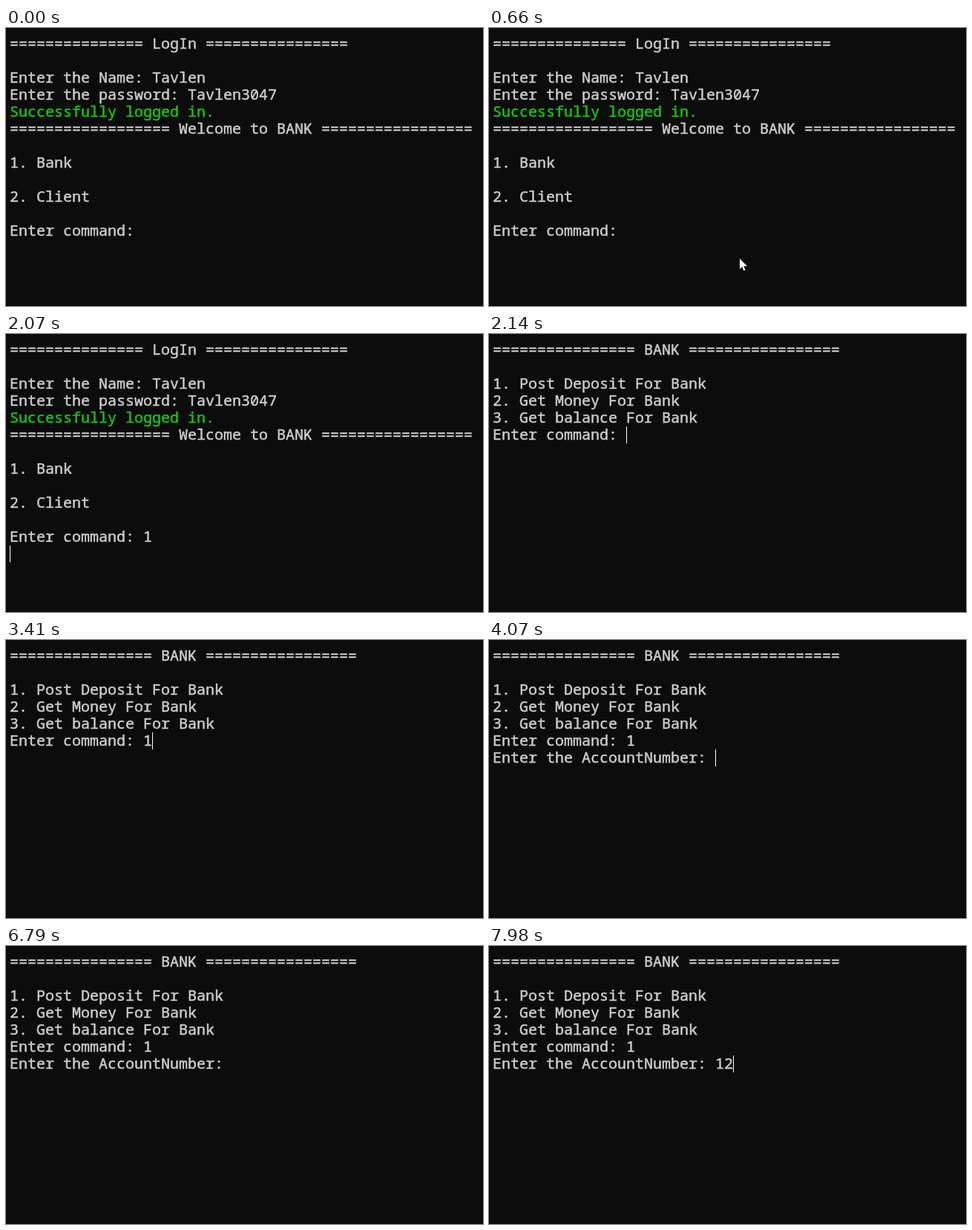
Recreate the animation shown at these times as an HTML page with a canvas. Size 643 by 376 pixels, loop 8 s.

```html
<!DOCTYPE html>
<html lang="en">
<head>
<meta charset="utf-8">
<title>Terminal session</title>
<style>
  html, body { margin: 0; width: 100%; height: 100%; overflow: hidden; background: #0c0c0c; }
  canvas { display: block; }
</style>
</head>
<body>
<canvas id="stage" width="643" height="376"></canvas>
<script>
const LOOP = 8000;
const LEFT = 5, TOP = 10, CELL = 12, ROW = 23, BASELINE = 18;
const GREEN = '#16c60c', GREY = '#cccccc';
const ctx = document.getElementById('stage').getContext('2d');

const rule = (left, title, right) => `${'='.repeat(left)} ${title} ${'='.repeat(right)}`;

const welcome = [
  rule(15, 'LogIn', 16), '',
  'Enter the Name: Tavlen',
  'Enter the password: Tavlen3047',
  'Successfully logged in.',
  rule(18, 'Welcome to BANK', 17), '',
  '1. Bank', '',
  '2. Client', '',
  'Enter command: '
];
const bank = [
  rule(16, 'BANK', 17), '',
  '1. Post Deposit For Bank',
  '2. Get Money For Bank',
  '3. Get balance For Bank',
  'Enter command: '
];
const account = 'Enter the AccountNumber: ';

// Each state starts at `at`: the screen, what is added to it, and whether the caret shows.
const states = [
  { at: 0,    screen: welcome, typed: '', caret: false },
  { at: 1260, screen: welcome, typed: '', caret: true },
  { at: 1530, screen: welcome, typed: '1', caret: true },
  { at: 2070, screen: welcome, typed: '1\n', caret: true },
  { at: 2140, screen: bank, typed: '', caret: true },
  { at: 2680, screen: bank, typed: '', caret: false },
  { at: 3210, screen: bank, typed: '', caret: true },
  { at: 3410, screen: bank, typed: '1', caret: true },
  { at: 4010, screen: bank, typed: '1\n', caret: true },
  { at: 4070, screen: bank, typed: '1\n' + account, caret: true, blinkFrom: 4670 },
  { at: 7720, screen: bank, typed: '1\n' + account + '1', caret: true },
  { at: 7980, screen: bank, typed: '1\n' + account + '12', caret: true }
];

function caretVisible(state, t) {
  if (!state.blinkFrom || t < state.blinkFrom) return state.caret;
  return Math.floor((t - state.blinkFrom) / 530) % 2 === 1;
}

function pointerPosition(t) {
  if (t < 460 || t >= 1600) return null;
  if (t >= 1260) return [253, 278];
  const step = Math.min(8, Math.floor((t - 460) / 66.25 + 1e-6));
  const rest = (1 - step / 8) ** 2;
  return [Math.round(250 + 224 * rest), Math.round(279 + 84 * rest)];
}

function drawPointer([x, y]) {
  const outline = [[0, 0], [0, 14], [3.2, 11], [5.4, 16.2], [7.6, 15.3], [5.4, 10.2], [10, 10]];
  ctx.fillStyle = '#fff';
  ctx.beginPath();
  for (const [dx, dy] of outline) ctx.lineTo(x + dx, y + dy);
  ctx.fill();
}

// A hairline stroke gives the text its medium weight.
function drawText(text, x, y, color) {
  ctx.font = '20px "Noto Sans Mono", monospace';
  ctx.fillStyle = ctx.strokeStyle = color;
  ctx.lineWidth = 0.5;
  ctx.lineJoin = 'round';
  ctx.fillText(text, x, y);
  ctx.strokeText(text, x, y);
}

function draw(t) {
  const state = states.findLast(s => s.at <= t);
  const lines = (state.screen.join('\n') + state.typed).split('\n');

  ctx.fillStyle = '#0c0c0c';
  ctx.fillRect(0, 0, 643, 376);
  lines.forEach((line, row) => {
    const color = line.startsWith('Success') ? GREEN : GREY;
    drawText(line, LEFT, TOP + row * ROW + BASELINE, color);
  });

  if (caretVisible(state, t)) {
    const row = lines.length - 1;
    ctx.fillStyle = '#fff';
    ctx.fillRect(LEFT + lines[row].length * CELL, TOP + row * ROW, 1, ROW);
  }

  const pointer = pointerPosition(t);
  if (pointer) drawPointer(pointer);
}

const start = performance.now();
function tick() {
  draw((performance.now() - start) % LOOP);
  requestAnimationFrame(tick);
}
tick();
</script>
</body>
</html>
```
